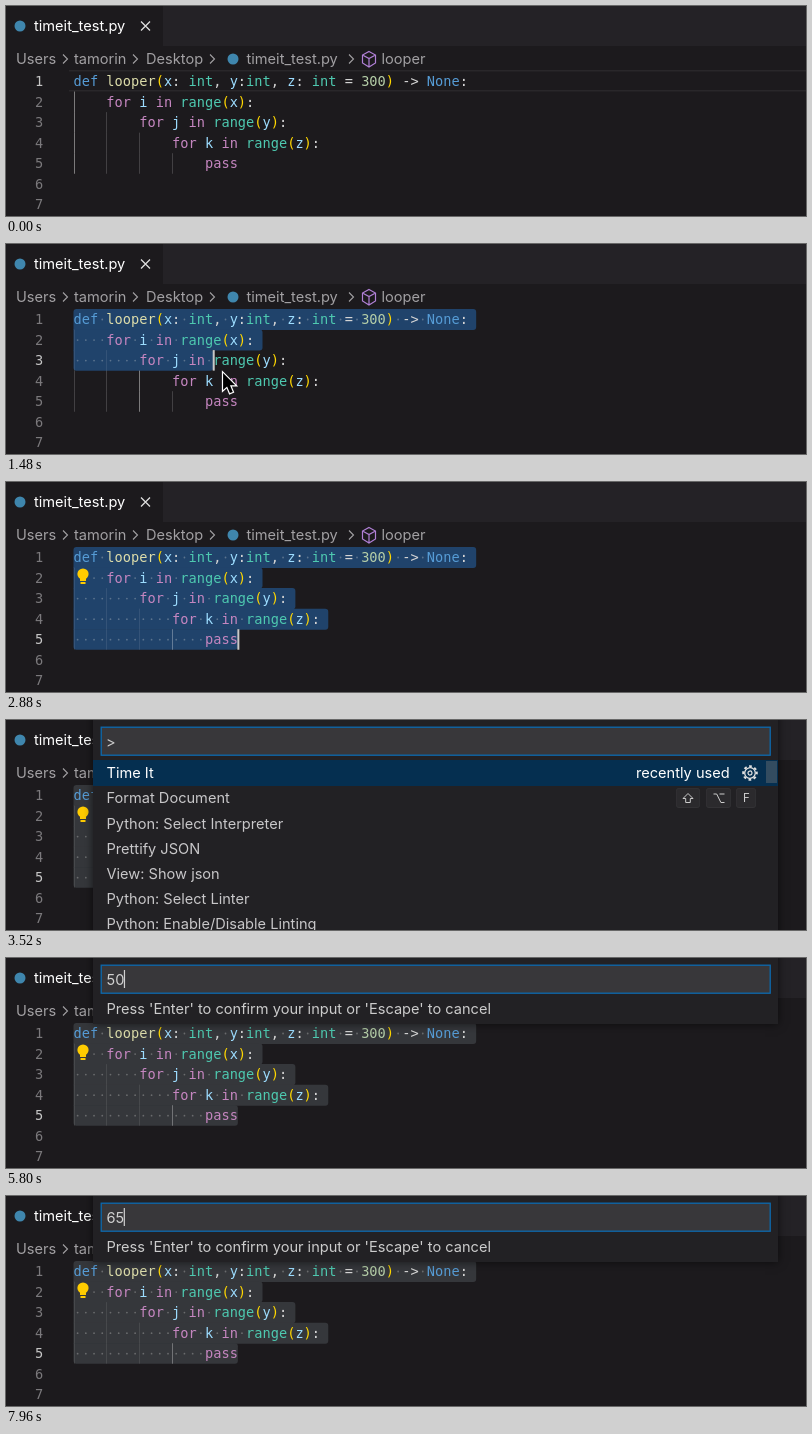
Recreate the animation shown at these times as an HTML page with a canvas. Size 800 px wide and 210 px high, loop 8000 ms.

```html
<!DOCTYPE html>
<html>
<head>
<meta charset="utf-8">
<style>
  html, body { margin: 0; width: 100%; height: 100%; overflow: hidden; background: #1c1a1d; }
  canvas { display: block; }
</style>
</head>
<body>
<canvas id="stage" width="800" height="210"></canvas>
<script>
const ctx = document.getElementById('stage').getContext('2d');
const LOOP = 8000;
const UI = '14.6px Inter, sans-serif';
const MONO = '13.65px "DejaVu Sans Mono", monospace';
const LEFT = 67.5, TOP = 65, CHAR = 8.218, ROW = 20.55;

const CODE = [
  'def looper(x: int, y:int, z: int = 300) -> None:',
  '    for i in range(x):',
  '        for j in range(y):',
  '            for k in range(z):',
  '                pass'
];
const COMMANDS = ['Time It', 'Format Document', 'Python: Select Interpreter', 'Prettify JSON',
  'View: Show json', 'Python: Select Linter', 'Python: Enable/Disable Linting'];
const SYNTAX = [
  [/^(def|None)$/, '#569cd6'], [/^(for|in|pass)$/, '#c586c0'], [/^(int|range)$/, '#4ec9b0'],
  [/^looper$/, '#dcdcaa'], [/^[a-z]$/, '#9cdcfe'], [/^\d+$/, '#b5cea8'], [/^[()]$/, '#ffd700']
];

// Pointer path: time, x, y
const PATH = [[320, 170, 215], [800, 66, 73], [920, 66, 73], [1200, 140, 88],
  [1480, 217, 129], [1720, 236, 152], [1960, 240, 153], [2440, 300, 215]];
const DRAG_START = 920, DRAG_END = 1720, BULB = 2200, PALETTE = 3160;
const PROMPTS = [
  { name: 'x', open: 4240, keys: [[5300, '5'], [5480, '0']] },
  { name: 'y', open: 6200, keys: [[7520, '6'], [7720, '5']] }
];

function rect(x, y, w, h, color) {
  ctx.fillStyle = color;
  ctx.fillRect(x, y, w, h);
}
function rounded(x, y, w, h, r, color) {
  ctx.fillStyle = color;
  ctx.beginPath();
  ctx.roundRect(x, y, w, h, r);
  ctx.fill();
}
function text(str, x, y, color, font = UI) {
  ctx.font = font;
  ctx.fillStyle = color;
  ctx.fillText(str, x, y);
}
function dot(x, y, r, color) {
  ctx.fillStyle = color;
  ctx.beginPath();
  ctx.arc(x, y, r, 0, 7);
  ctx.fill();
}
function line(d, color, width = 1.1) {
  ctx.strokeStyle = color;
  ctx.lineWidth = width;
  ctx.stroke(new Path2D(d));
}

function pointerAt(t) {
  if (t <= PATH[0][0]) return PATH[0].slice(1);
  for (let i = 1; i < PATH.length; i++) {
    const [t0, x0, y0] = PATH[i - 1], [t1, x1, y1] = PATH[i];
    if (t <= t1) {
      const p = (t - t0) / (t1 - t0);
      return [x0 + (x1 - x0) * p, y0 + (y1 - y0) * p];
    }
  }
  return PATH[PATH.length - 1].slice(1);
}

// The caret follows the pointer slightly late while dragging.
function caretAt(t) {
  if (t < DRAG_START) return { row: 0, col: 0 };
  const [x, y] = pointerAt(Math.min(t - 40, DRAG_END));
  const row = Math.max(0, Math.min(4, Math.floor((y - TOP) / ROW)));
  const col = Math.max(0, Math.min(CODE[row].length, Math.round((x - LEFT) / CHAR)));
  return { row, col };
}

function drawHeader() {
  rect(0, 0, 800, 210, '#1c1a1d');
  rect(157, 0, 643, 40, '#242226');
  dot(14, 20, 5.5, '#3f86ad');
  text('timeit_test.py', 28, 25, '#fff');
  line('M135 15.5l9 9m0-9l-9 9', '#ddd', 1.3);

  const gray = '#a2a0a3';
  text('Users', 10, 58, gray);
  text('tamorin', 68, 58, gray);
  text('Desktop', 140, 58, gray);
  dot(227, 53, 5.5, '#3f86ad');
  text('timeit_test.py', 240.5, 58, gray);
  text('looper', 375.5, 58, gray);
  for (const x of [57, 127, 204, 343]) line(`M${x} 48.5l4.5 4.5l-4.5 4.5`, gray);
  line('M363 45.5l6.5 3.5v8l-6.5 4l-6.5-4v-8zM356.5 49l6.5 3.5l6.5-3.5M363 52.5v8.5', '#b180d7', 1.2);
}

function drawSelection(caret, color) {
  for (let row = 0; row <= caret.row; row++) {
    const last = row === caret.row;
    const cols = last ? caret.col : CODE[row].length + 1;
    const y = TOP + row * ROW;
    rounded(LEFT, y, cols * CHAR, ROW + (last ? 0 : 0.5),
      [row ? 0 : 3, 3, 3, last ? 3 : 0], color);
    for (let col = 0; col < cols; col++) {
      if (CODE[row][col] === ' ') {
        dot(LEFT + (col + 0.5) * CHAR, y + 10.5, 0.9, 'rgba(227,228,226,.3)');
      }
    }
  }
}

function drawEditor(t) {
  const caret = caretAt(t);
  const selected = caret.row + caret.col > 0;
  const focused = t < PALETTE;

  if (selected) drawSelection(caret, focused ? '#20436b' : '#35373b');
  else {
    rect(63, 64, 737, 1.5, '#29272a');
    rect(63, 84, 737, 1.5, '#29272a');
  }

  const activeCol = Math.min(caret.row, 3) * 4;
  CODE.forEach((source, row) => {
    const y = TOP + row * ROW;
    const indent = source.search(/\S/);
    for (let col = 0; col < indent; col += 4) {
      const covered = selected && row <= caret.row;
      const active = col === activeCol;
      const alpha = covered ? (active ? 0.3 : 0.09) : (active ? 0.42 : 0.17);
      rect(Math.round(LEFT + col * CHAR), y, 1, ROW, `rgba(255,255,255,${alpha})`);
    }
    for (const { 0: token, index } of source.matchAll(/\w+|[^\w\s]/g)) {
      const rule = SYNTAX.find(([pattern]) => pattern.test(token));
      text(token, LEFT + index * CHAR, y + 15, rule ? rule[1] : '#d4d4d4', MONO);
    }
  });

  for (let row = 0; row < 7; row++) {
    text(String(row + 1), 29, TOP + row * ROW + 15, row === caret.row ? '#c6c6c6' : '#7b797c', MONO);
  }

  const dragging = t >= DRAG_START && t < DRAG_END + 160;
  if (focused && (dragging || (t + 500) % 1000 < 500)) {
    rect(LEFT + caret.col * CHAR - 0.5, TOP + caret.row * ROW, 2, ROW, '#c8c8c8');
  }
  if (t >= BULB) drawBulb();
}

function drawBulb() {
  rect(70, 86, 14, 17, t0Color());
  dot(77, 92, 5.6, '#fc0');
  rect(74, 95, 6, 4, '#fc0');
  rect(74.5, 100, 5, 2, '#fc0');
}
function t0Color() {
  return now < PALETTE ? '#20436b' : '#35373b';
}

function drawPointer(t) {
  if (t < PATH[0][0] || t > PATH[PATH.length - 1][0]) return;
  const [x, y] = pointerAt(t);
  const arrow = new Path2D('M0 0V17L4 13.3L6.8 20L9.7 18.8L6.9 12.2H12.2Z');
  ctx.save();
  ctx.translate(x, y);
  ctx.lineWidth = 2.4;
  ctx.strokeStyle = '#fff';
  ctx.stroke(arrow);
  ctx.fillStyle = '#000';
  ctx.fill(arrow);
  ctx.restore();
}

function drawPanel(height) {
  ctx.save();
  ctx.shadowColor = 'rgba(0,0,0,.6)';
  ctx.shadowBlur = 9;
  rect(87, -10, 685, height + 10, '#222124');
  ctx.restore();
  rect(95, 7, 669.5, 28.5, '#38373a');
  ctx.strokeStyle = '#0b69ae';
  ctx.lineWidth = 1.3;
  ctx.strokeRect(95.2, 7.2, 669, 28);
}

function drawInputCaret(x, age) {
  if (age % 1000 < 500) rect(x, 12, 1.2, 18, '#d0d0d0');
}

function drawGear(x, y) {
  ctx.strokeStyle = '#e0e0e0';
  const ring = (r, width, dash) => {
    ctx.lineWidth = width;
    ctx.setLineDash(dash);
    ctx.beginPath();
    ctx.arc(x, y, r, -0.2, Math.PI * 2 - 0.2);
    ctx.stroke();
  };
  const tooth = Math.PI * 6.8 / 8;
  ring(5.3, 1.3, []);
  ring(6.8, 2, [tooth, tooth]);
  ring(2, 1.2, []);
  ctx.setLineDash([]);
}

function drawPalette(t) {
  drawPanel(220);
  text('>', 100, 27, '#ccc');
  drawInputCaret(110, t - PALETTE + 150);
  rect(87, 40, 685, 26, '#052f50');
  COMMANDS.forEach((name, i) => text(name, 100.5, 58.3 + i * 25.1, i ? '#c8c7c9' : '#fff'));
  text('recently used', 630, 58.3, '#fff');
  drawGear(744, 53);
  rect(760, 41, 11, 22, 'rgba(121,121,121,.4)');

  for (const [x, w] of [[670, 24], [700, 25], [730, 20]]) {
    rounded(x, 68, w, 20, 3, '#333235');
    rounded(x + 0.7, 68.7, w - 1.4, 18.3, 2.5, '#2b2a2d');
  }
  line('M682 73.5l5 5h-2.7v4h-4.6v-4h-2.7z', '#ccc', 1);
  line('M707.5 74h3.2l4.2 8.5h3.6M713.5 74h5', '#ccc', 1);
  text('F', 737, 82, '#ccc', '11.5px Inter, sans-serif');
}

function drawPrompt(prompt, t) {
  drawPanel(66);
  const pressed = prompt.keys.filter(([at]) => t >= at);
  const value = pressed.map(([, key]) => key).join('');
  if (value) text(value, 100.5, 27, '#d0d0d0');
  else text(`Enter value for ${prompt.name} (type: int, default: )`, 100.5, 27, '#8b8a8d');
  const since = pressed.length ? pressed[pressed.length - 1][0] : prompt.open;
  ctx.font = UI;
  drawInputCaret(100 + ctx.measureText(value).width, t - since);
  text("Press 'Enter' to confirm your input or 'Escape' to cancel", 100.5, 56, '#ccc');
}

let now = 0;
function frame() {
  now = performance.now() % LOOP;
  drawHeader();
  drawEditor(now);
  drawPointer(now);
  const prompt = PROMPTS.filter(p => now >= p.open).pop();
  if (prompt) drawPrompt(prompt, now);
  else if (now >= PALETTE) drawPalette(now);
  requestAnimationFrame(frame);
}
frame();
</script>
</body>
</html>
```
